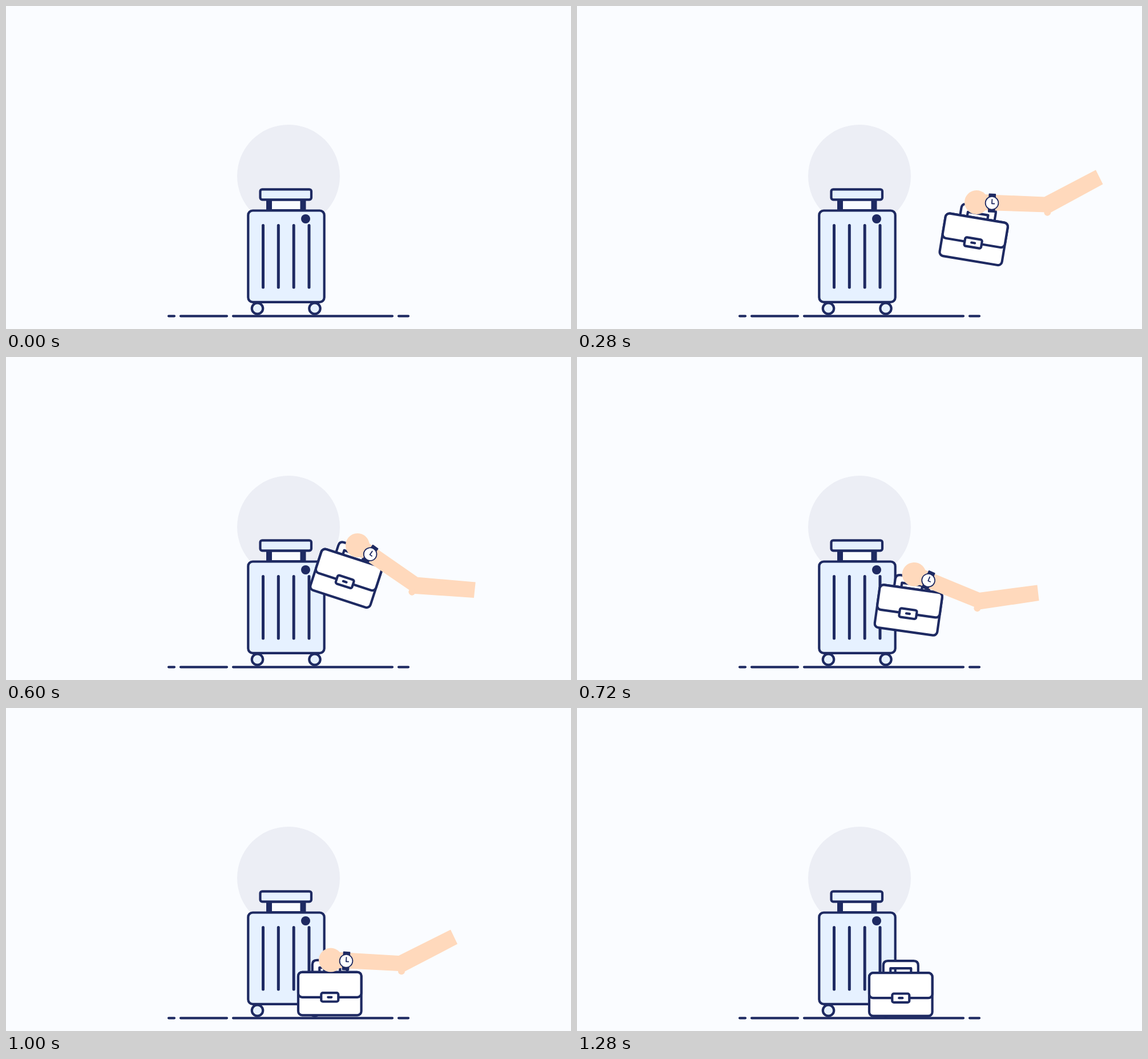
Write an HTML page that moves like this. It is 990 by 566 pixels and loops after 1320 ms.

```html
<!DOCTYPE html>
<html lang="en">
<head>
<meta charset="utf-8">
<title>Packing the luggage</title>
<style>
  html, body { margin: 0; height: 100%; overflow: hidden; background: #fafcff; }
  svg { display: block; width: 990px; height: 566px; }
  .line { stroke: #1e2a62; stroke-width: 4.2; stroke-linecap: round; stroke-linejoin: round; fill: none; }
  .blue { fill: #e6f1ff; }
  .white { fill: #fff; }
  .navy { fill: #1e2a62; }
  .skin { fill: #ffd9bc; }
</style>
</head>
<body>
<svg viewBox="0 0 990 566">
  <circle cx="495" cy="298" r="90" fill="#eceef5"/>
  <path class="line" d="M285 543.3H295M306 543.3H387M398 543.3H677M688 543.3H705"/>

  <g id="suitcase">
    <rect x="461" y="340" width="60" height="18" fill="#fafcff"/>
    <path class="navy" d="M456 339h10v20h-10zM515.5 339h10v20h-10z"/>
    <path class="line" style="stroke-width:2.5" d="M466 340.2H516M466 357.2H516"/>
    <rect class="line blue" x="445.5" y="321.3" width="89.5" height="18" rx="3.5"/>
    <circle class="line blue" cx="440.5" cy="530" r="9.7"/>
    <circle class="line blue" cx="541" cy="530" r="9.7"/>
    <rect class="line blue" x="424.3" y="358.5" width="133.4" height="160.3" rx="8"/>
    <path class="line" style="stroke-width:5" d="M450.5 384.5V493M477.3 384.5V493M504.2 384.5V493M531 384.5V493"/>
    <circle class="navy" cx="525" cy="373" r="8"/>
  </g>

  <g id="bag">
    <path class="line white" d="M-30.5 -37.5V-50.5Q-30.5 -58.5 -22.5 -58.5H22.5Q30.5 -58.5 30.5 -50.5V-37.5H18V-45.5H-18V-37.5Z"/>
    <rect class="line white" x="-55.3" y="-37.5" width="110.6" height="75.5" rx="7"/>
    <rect class="line white" x="-55.3" y="-37.5" width="110.6" height="44" rx="7"/>
    <rect class="line white" x="-15" y="-1.2" width="30" height="15.4" rx="3"/>
    <path class="line" d="M-3 6.5H3"/>
  </g>

  <g id="arm">
    <path class="skin" d="M0 -14.5L119 -7.5L210 -53L222 -28L130 20L0 13.5Z"/>
    <circle class="skin" cx="124" cy="19.8" r="6"/>
    <circle class="skin" r="21"/>
    <g transform="translate(27 1.7) rotate(4)">
      <rect class="navy" x="-6.3" y="-16.5" width="12.6" height="33" rx="1"/>
      <circle class="line white" style="stroke-width:1.8" r="11.4"/>
      <path class="line" style="stroke-width:1.8;stroke-linecap:butt" d="M0 -7V1H5"/>
    </g>
  </g>
</svg>
<script>
const LOOP = 1320, STEP = 40, ENTER = 80, ARM_GONE = 1280;

// Poses: time, x, y, rotation
const armPoses = [
  [80, 831, 399, -41], [280, 700, 344, -1], [440, 645, 291, 31.5], [600, 616, 330, 31.5],
  [880, 569, 435, 0], [1120, 569, 444, 0], [1160, 609, 438, 0], [1240, 696, 425, 0]
];
const bagPoses = [
  [80, 846, 460, -19], [280, 695.2, 408.6, 9.5], [440, 609.5, 341.5, 32], [600, 595.7, 387.6, 18],
  [880, 567.3, 498, 0], [1120, 567.3, 501.7, 0]
];

const slope = (poses, i, k) => (poses[i + 1][k] - poses[i][k]) / (poses[i + 1][0] - poses[i][0]);

// Tangents that never overshoot between poses
function tangent(poses, i, k) {
  if (i === 0) return slope(poses, 0, k);
  if (i === poses.length - 1) return slope(poses, i - 1, k);
  const a = slope(poses, i - 1, k), b = slope(poses, i, k);
  return a * b > 0 ? 2 * a * b / (a + b) : 0;
}

function sample(poses, t, k) {
  const last = poses.length - 1;
  if (t >= poses[last][0]) return poses[last][k];
  const i = Math.max(0, poses.findIndex(p => p[0] > t) - 1);
  const span = poses[i + 1][0] - poses[i][0];
  const s = (t - poses[i][0]) / span, r = 1 - s;
  return poses[i][k] * r * r * (1 + 2 * s) + poses[i + 1][k] * s * s * (3 - 2 * s)
    + span * s * r * (tangent(poses, i, k) * r - tangent(poses, i + 1, k) * s);
}

function place(id, poses, t, visible) {
  const part = document.getElementById(id);
  part.style.display = visible ? "" : "none";
  if (!visible) return;
  const [x, y, angle] = [1, 2, 3].map(k => sample(poses, t, k));
  part.setAttribute("transform", `translate(${x} ${y}) rotate(${angle})`);
}

let start;
function draw(now) {
  start ??= now;
  const t = Math.floor((now - start) % LOOP / STEP) * STEP;
  place("bag", bagPoses, t, t >= ENTER);
  place("arm", armPoses, t, t >= ENTER && t < ARM_GONE);
  requestAnimationFrame(draw);
}
requestAnimationFrame(draw);
</script>
</body>
</html>
```
